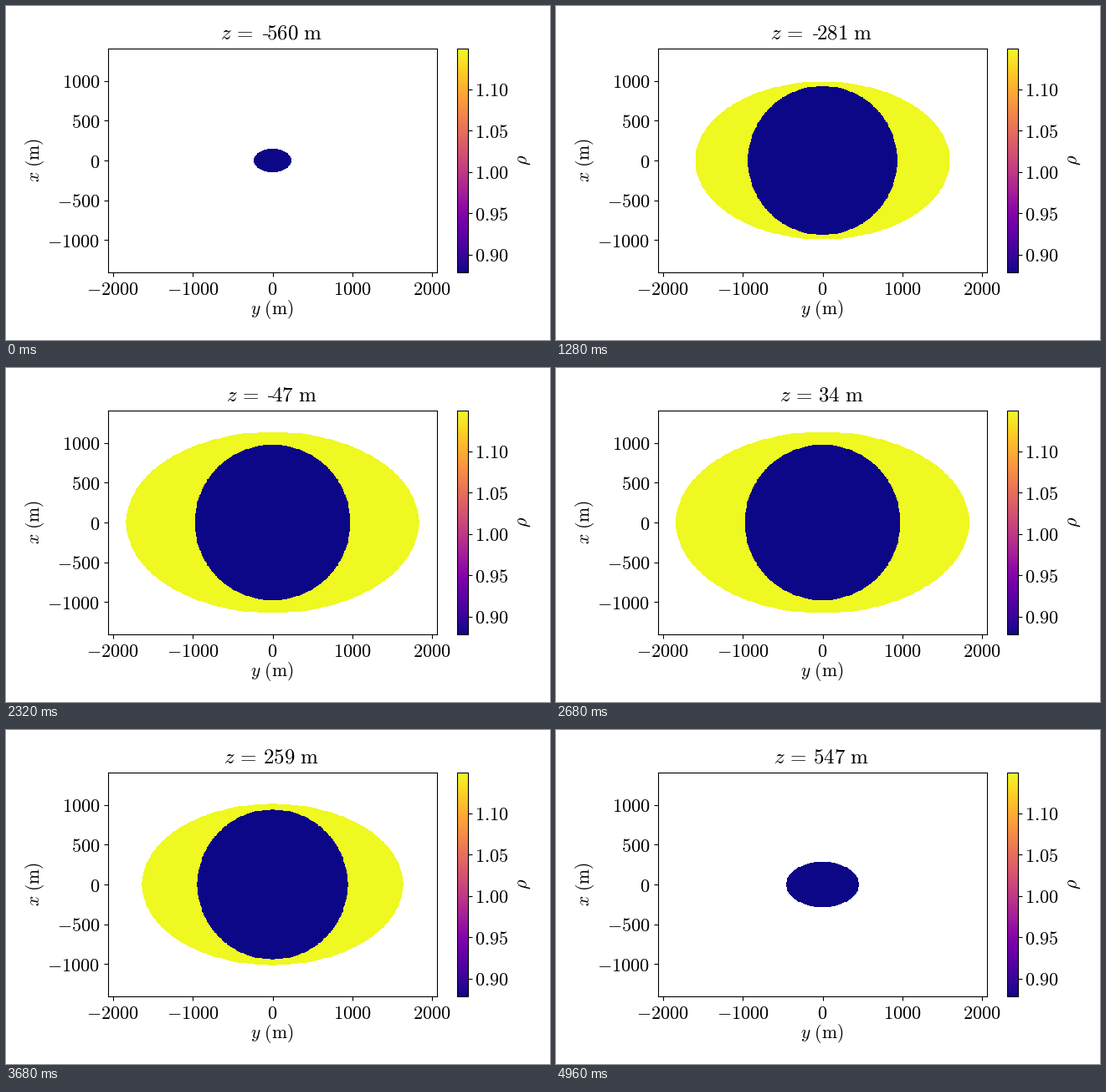
Animation of 650 by 400 pixels, one loop 5000 ms. Source, as a matplotlib script:

```python
import numpy as np
import matplotlib.pyplot as plt
from matplotlib.animation import FuncAnimation
from matplotlib.patches import Rectangle

W, H, DPI = 650, 400, 100
FRAMES, INTERVAL = 125, 40

STEP = 9                              # grid spacing in metres, also the z step
COLS, ROWS = 458, 312
Z_START = -560
SEMI_Y, SEMI_X, SEMI_Z = 1839, 1140, 564.7
CORE_RADIUS = 976
RHO_CORE, RHO_SHELL = 0.8788, 1.1489

plt.rcParams.update({
    "mathtext.fontset": "cm",
    "font.family": "DejaVu Serif",
    "font.size": 16,
})

fig = plt.figure(figsize=(W / DPI, H / DPI), dpi=DPI, facecolor="white")


def add_axes(left, top, right, bottom):
    """Axes placed by pixel edges, measured from the top left."""
    return fig.add_axes([left / W, 1 - bottom / H,
                         (right - left) / W, (bottom - top) / H])


def label(x, y, text, **kw):
    return fig.text(x / W, 1 - y / H, text, **kw)


def cell_centres(count):
    return (np.arange(count) - (count - 1) / 2) * STEP


# Density slice
ax = add_axes(122, 51, 515, 319)
Y, X = np.meshgrid(cell_centres(COLS), cell_centres(ROWS))
ELLIPSE = (Y / SEMI_Y) ** 2 + (X / SEMI_X) ** 2
RADIUS2 = Y ** 2 + X ** 2


def density(z):
    rho = np.where(RADIUS2 + z ** 2 <= CORE_RADIUS ** 2, RHO_CORE, RHO_SHELL)
    outside = ELLIPSE + (z / SEMI_Z) ** 2 > 1
    return np.ma.masked_where(outside, rho)


y_max, x_max = COLS * STEP / 2, ROWS * STEP / 2
image = ax.imshow(density(Z_START), cmap="plasma", origin="lower",
                  vmin=RHO_CORE, vmax=RHO_SHELL, aspect="auto",
                  interpolation="nearest",
                  extent=(-y_max, y_max, -x_max, x_max))
y_ticks = range(-2000, 2001, 1000)
x_ticks = range(-1000, 1001, 500)
ax.set_xticks(y_ticks, [f"${v}$" for v in y_ticks])
ax.set_yticks(x_ticks, [f"${v}$" for v in x_ticks])

# Colour bar
cax = add_axes(539, 51, 552, 319)
bar = fig.colorbar(image, cax=cax)
rho_ticks = [0.90, 0.95, 1.00, 1.05, 1.10]
bar.set_ticks(rho_ticks, labels=[f"${v:.2f}$" for v in rho_ticks])
cax.tick_params(pad=2.5)

centred = dict(ha="center", va="center", fontsize=15.5)
label(317.5, 363.2, r"$y\ \mathrm{(m)}$", **centred)
label(35, 184.5, r"$x\ \mathrm{(m)}$", rotation=90, **centred)
label(618, 184, r"$\rho$", rotation=90, ha="center", va="center")

# Title: "z =", an optional hyphen, then the value
BASELINE = 40
title = dict(va="baseline", fontsize=18)
lead = label(257, BASELINE, r"$z\hspace{0.15}=$", ha="left", **title)
value = label(378, BASELINE, "", ha="right", **title)
hyphen = Rectangle((0, 1 - (BASELINE - 4.8) / H), 6.3 / W, 1.5 / H,
                   transform=fig.transFigure, facecolor="black", linewidth=0)
fig.add_artist(hyphen)


def set_title(z):
    digits = str(abs(z))
    width = 76.5 + 12.4 * len(digits) + 8 * (z < 0)
    left = 317.3 - width / 2
    lead.set_x(left / W)
    value.set_x((left + width) / W)
    value.set_text(rf"$\mathrm{{{digits}\ m}}$")
    hyphen.set_x((left + 50.5) / W)
    hyphen.set_visible(z < 0)


def update(frame):
    # the first slice is held for two ticks
    z = Z_START + STEP * max(frame - 1, 0)
    image.set_data(density(z))
    set_title(z)
    return image, lead, value, hyphen


anim = FuncAnimation(fig, update, frames=FRAMES, interval=INTERVAL,
                     repeat=True, repeat_delay=0, blit=False)
plt.show()
```
